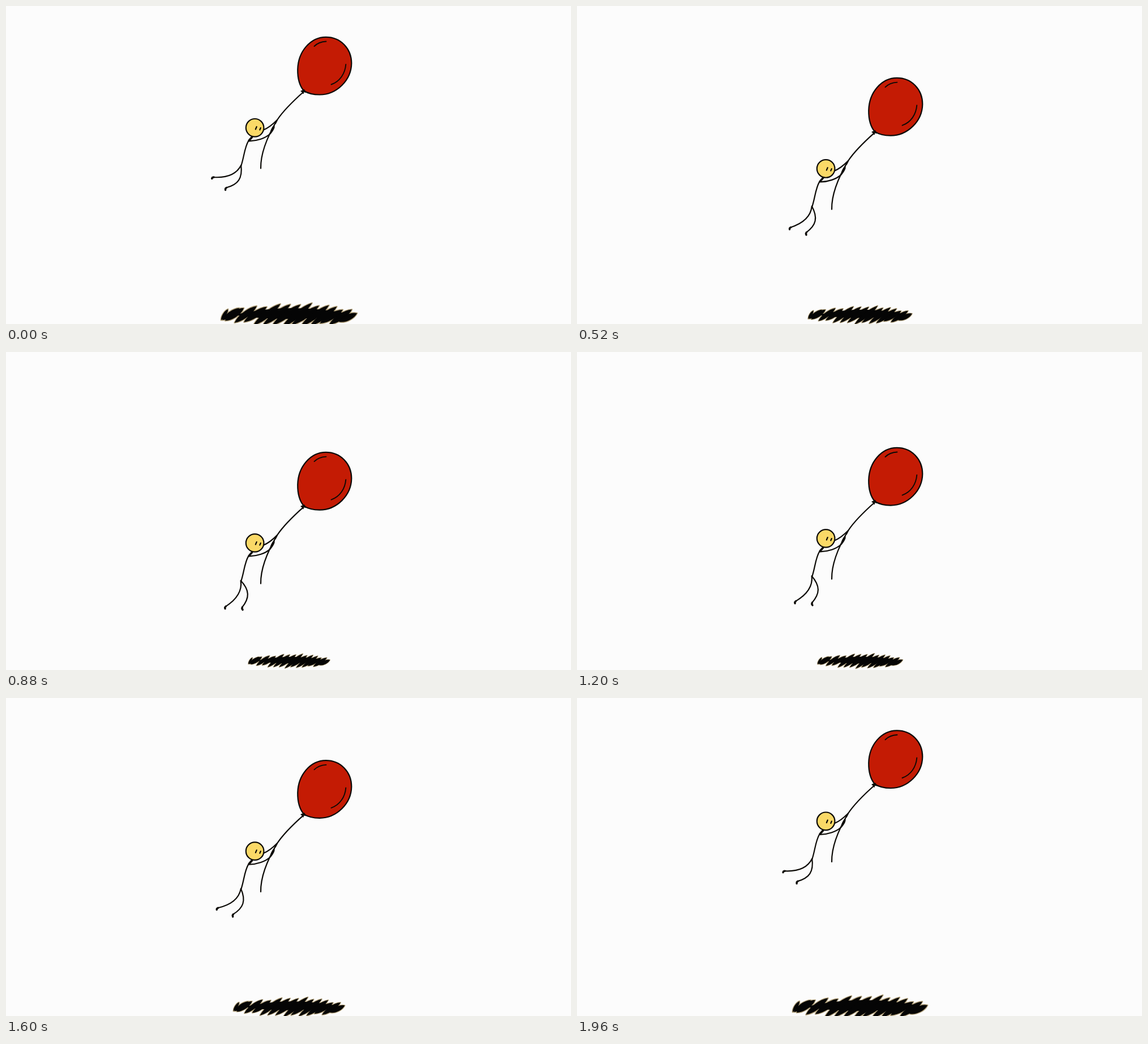
These frames come from a looping animation (998 px wide and 561 px high, 2000 ms). An HTML page with a canvas:

```html
<!DOCTYPE html>
<html>
<head>
<meta charset="utf-8">
<title>Balloon ride</title>
<style>
html, body { margin: 0; width: 100%; height: 100%; overflow: hidden; background: #fcfcfc; }
canvas { display: block; width: 998px; height: 561px; }
</style>
</head>
<body>
<canvas id="stage" width="998" height="561"></canvas>
<script>
const ctx = document.getElementById('stage').getContext('2d');
const LOOP = 2000, STEP = 40;
const INK = '#0c0a06', RED = '#c41b04', YELLOW = '#fad967', TAN = '#b3a27c', PAPER = '#fcfcfc';
const HIP = [415.2, 282];

const path = d => new Path2D(d);
const balloon = path('M526 149.500C518 140 515 127 515.200 112C516 80 538 54.800 565 54.800C591 54.800 610.300 75 610.300 101C610 131 584 156.500 554 156.500C543 156.500 533 154 526 149.500Z');
const shine = path('M544.500 71C550 65.500 557 63 565.500 62.500M600.300 103C599 119 590 133 574.500 138.500');
const knot = path('M521 150L527 147.500L529.500 152.500L526 151.500L525 155L523.500 152.500Z');
const string = path('M525.500 151.500C508 167 491 183 479 201C463 228 449.500 259 450 286.500');
const arms = path('M455 218.500C464 215 471 209 479 201L476 207M428.500 238.300C443 238.500 459 233 467 225C471 220 474.500 215 473.500 211.500C471 214 469.500 217 468 221');
const body = path('M434 231L428.500 237.500C421 250 420.500 267 415.200 282');
const neck = path('M434.500 231.500L429.500 237');
const legs = path('M415.200 281C407 297 389 303.500 366 302M415.200 281C418 304 410 315 389 320.500');
const feet = path('M367 302L364.500 302.700L363.700 304.500M389.500 320.500L387.700 322L387.500 324.500');
const eyes = path('M442.700 213L440.800 217.500M449.800 215L448.300 218.500');

function line(p, width = 2.2, color = INK) {
  ctx.strokeStyle = color;
  ctx.lineWidth = width;
  ctx.stroke(p);
}

function shape(p, color) {
  ctx.fillStyle = color;
  ctx.fill(p);
  line(p);
}

// A pen stroke that swells in the middle and is pointed at both ends.
function dash(x1, y1, x2, y2, half) {
  const dx = x2 - x1, dy = y2 - y1, len = Math.hypot(dx, dy);
  const at = (k, side) => [x1 + dx * k - side * dy / len * half, y1 + dy * k + side * dx / len * half];
  const p = new Path2D();
  p.moveTo(x1, y1);
  p.bezierCurveTo(...at(0.25, 1), ...at(0.75, 1), x2, y2);
  p.bezierCurveTo(...at(0.75, -1), ...at(0.25, -1), x1, y1);
  return p;
}

// The top edge is nearly solid, with narrow gaps lower down.
const core = path('M402 545Q500 522 606 543Q500 560 402 545Z');
const scribble = [dash(380, 554, 392, 535, 4), dash(382, 554, 412, 533, 6)];
for (let i = 0; i < 13; i++) {
  const k = i / 12, arch = Math.sin(Math.PI * k);
  const x = 387 + 201 * k, wob = 2 * Math.sin(i * 2.4);
  scribble.push(dash(x, 555 + 8 * arch + 3 * k + wob, x + 33 + 18 * arch + wob, 533 + 8 * k - 11 * arch - wob, 7.2));
}

function drawShadow(scale) {
  ctx.save();
  ctx.translate(500.3, 545);
  ctx.scale(scale, scale);
  ctx.translate(-500.3, -545);
  for (const p of scribble) line(p, 2.8, TAN);
  ctx.fillStyle = '#050505';
  for (const p of [core, ...scribble]) ctx.fill(p);
  ctx.restore();
}

function drawRider(drop) {
  ctx.save();
  ctx.translate(0, drop);
  line(string);
  shape(balloon, RED);
  line(shine, 1.9);
  ctx.fillStyle = INK;
  ctx.fill(knot);
  line(knot, 1);
  line(arms);
  line(body);
  line(neck, 3.6);

  const head = new Path2D();
  head.arc(439.6, 214.8, 15.8, 0, 7);
  shape(head, YELLOW);
  line(eyes, 2.2);

  ctx.translate(HIP[0], HIP[1]);
  ctx.rotate(-drop * 0.298 * Math.PI / 180);
  ctx.translate(-HIP[0], -HIP[1]);
  line(legs);
  line(feet, 3.4);
  ctx.restore();
}

function draw(now) {
  const n = Math.floor(now % LOOP / STEP);
  const drop = Math.min(5.55 * n, 2.5 + 5.87 * (49 - n));
  ctx.fillStyle = PAPER;
  ctx.fillRect(0, 0, 998, 561);
  ctx.lineCap = ctx.lineJoin = 'round';
  drawShadow(1 - 0.00327 * drop);
  drawRider(drop);
}

const start = performance.now();
function tick() {
  draw(performance.now() - start);
  requestAnimationFrame(tick);
}
tick();
</script>
</body>
</html>
```
